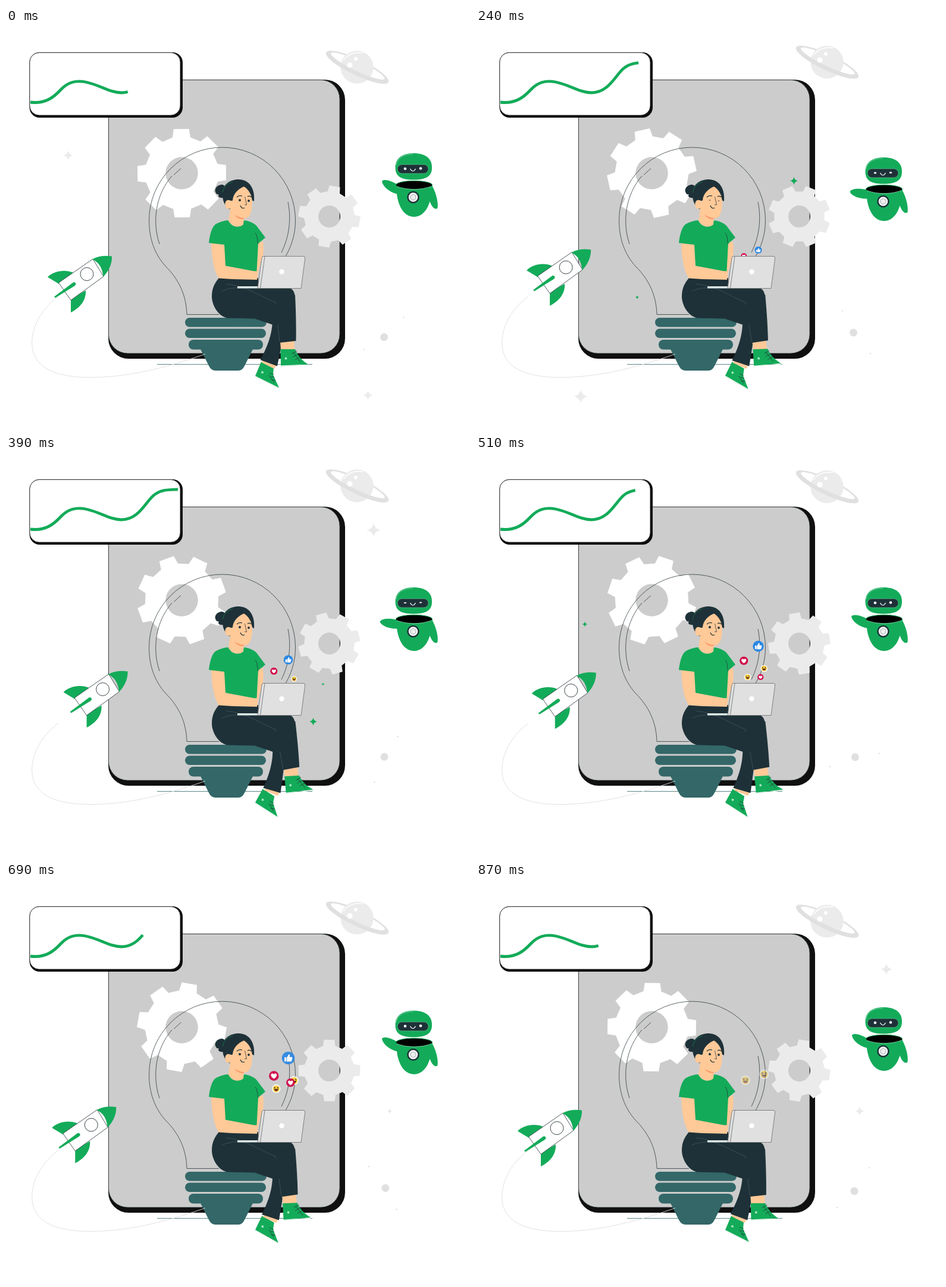
These frames come from a looping animation (780x672 px, 0.9 s). An HTML page:

```html
<!DOCTYPE html>
<html lang="en">
<head>
<meta charset="utf-8">
<title>Bright idea</title>
<style>
html, body { margin: 0; width: 100%; height: 100%; overflow: hidden; background: #fff; }
svg { display: block; width: 100%; height: 100%; }
.g { fill: #13ab59; }
.d { fill: #1e3138; }
.skin { fill: #ffc998; }
.thin { fill: none; stroke: #263238; stroke-width: .75; }
.crease { fill: none; stroke: #42565e; stroke-width: .8; }
</style>
</head>
<body>
<svg viewBox="0 0 780 672">
  <defs>
    <path id="star" d="M0-1Q.17-.17 1 0Q.17.17 0 1Q-.17.17-1 0Q-.17-.17 0-1Z"/>
    <g id="like">
      <circle r="10" fill="#2b87e3"/>
      <path fill="#fff" d="M-6-1h3v6.500h-3zM-2.200-.8L.8-5.800Q2.800-6 2.500-3.500L2-1.500H5.500Q7-1 6.300 1L5 5Q4.500 5.800 3 5.800H-2.200Z"/>
    </g>
    <g id="heart">
      <circle r="10" fill="#d10748"/>
      <path fill="#fff" d="M0 6C-11-1-4-8 0-3C4-8 11-1 0 6Z"/>
    </g>
    <g id="laugh">
      <circle r="10" fill="#fff"/>
      <circle r="8" fill="#fbd23f"/>
      <path d="M-5 .5H5Q4 6 0 6T-5 .5Z" fill="#4a2a18"/>
      <path d="M-2.800 4.500Q0 2.500 2.800 4.500Q0 7-2.800 4.500" fill="#e2483d"/>
      <path d="M-5.500-4L-2-2.500L-5.500-1M5.500-4L2-2.500L5.500-1" fill="none" stroke="#4a2a18" stroke-width="1.300"/>
    </g>
  </defs>

  <!-- panel and chart card -->
  <rect x="172" y="87" width="398" height="470" rx="34" fill="#101010"/>
  <rect x="172.400" y="87.400" width="388.600" height="460.600" rx="32" fill="#ccc" stroke="#263238" stroke-width=".8"/>
  <rect x="39.500" y="41" width="257.500" height="110" rx="17" fill="#0c0c0c"/>
  <rect x="39.800" y="41.400" width="253.200" height="105.600" rx="16" fill="#fff" stroke="#111" stroke-width=".8"/>
  <path id="chart" fill="none" stroke="#13ab59" stroke-width="4.800" d="M41 125C66 128 80 117 92 104C104 91 117 88 134 91C158 96 175 109 194 109C222 109 233 82 247 69C259 58 272 58.500 289 58"/>

  <!-- planet -->
  <g id="planet">
    <path id="ring" fill="#e0e0e0" fill-rule="evenodd" transform="translate(590.500 66) rotate(25.500)" d="M-58 0A58 13.500 0 0 1 58 0A58 13.500 0 0 1-58 0ZM-50-2A50 8.500 0 0 0 50-2A50 8.500 0 0 0-50-2Z"/>
    <circle cx="590" cy="66" r="27.700" fill="#ebebeb"/>
    <path fill="#e0e0e0" transform="translate(590.500 66) rotate(25.500)" d="M-58 0A58 13.500 0 0 0 58 0L50-2A50 8.500 0 0 1-50-2Z"/>
    <circle cx="578" cy="62.500" r="4.600" fill="#fff"/>
    <circle cx="588" cy="52" r="3" fill="#fff"/>
    <path d="M567 55Q578 39 600 42" fill="none" stroke="#fff" stroke-width="1.300"/>
  </g>

  <g id="dots" fill="#e0e0e0">
    <circle r="6.500"/><circle r="1.200"/><circle r="1.200"/>
  </g>

  <!-- robot -->
  <g id="robot">
    <path id="wave" class="g" d="M659 280C645 277 633 267 632 258C636 253 650 258 660 265Z"/>
    <path class="g" d="M714 262C722 274 727 292 725.500 303C721 308 715 300 712 291Z"/>
    <path class="g" d="M656 264C656 298 668 318 686 318C704 318 716 297 716.500 264Z"/>
    <ellipse cx="686" cy="264.500" rx="30.500" ry="7.200" fill="#000" stroke="#13ab59"/>
    <path d="M657 267Q686 277 715 267" fill="none" stroke="#8fd9b1" stroke-width=".8"/>
    <circle cx="684.500" cy="285" r="9" fill="#fff" stroke="#1e3138" stroke-width="2.500"/>
    <path d="M684.500 280l4.400 2.500v5l-4.400 2.500l-4.400-2.500v-5z" fill="#eee" stroke="#8a9a98" stroke-width=".8"/>
    <path class="g" d="M685 211C707 211 716 221 716 235C716 250 706 255.500 685 255.500S654.500 250 654.500 235C654.500 221 664 211 685 211Z"/>
    <path d="M656 231C658 218 669 212.500 684 212.500" fill="none" stroke="#8fd9b1" stroke-width=".8"/>
    <rect x="658" y="230" width="52" height="15" rx="7.500" class="d" stroke="#6cc796" stroke-width=".6"/>
    <g fill="#fff"><ellipse class="led" cx="671" cy="237" rx="2.300"/><ellipse class="led" cx="697" cy="236.500" rx="2.300"/></g>
    <path d="M679.500 237Q684 245 688.500 237" fill="none" stroke="#fff" stroke-width="1.200"/>
  </g>

  <!-- gears and bulb -->
  <path id="big" fill="#fff" fill-rule="evenodd"/>
  <path id="small" fill="#ebebeb" fill-rule="evenodd"/>
  <g class="thin">
    <path d="M358 482.500H304C303 450 291 424 268 401C250 381 240.500 355 240.500 324A123 123 0 0 1 486.500 324C486.500 349 479 370 468 388"/>
    <path d="M282 247.500L294 236.500M279 249C252 280 245 325 258 364M474 293C480 322 476 352 463 378"/>
  </g>
  <g fill="#336768">
    <rect x="301" y="488" width="137" height="15.500" rx="7.700"/>
    <rect x="301" y="506.500" width="136" height="15.500" rx="7.700"/>
    <rect x="307" y="525" width="125" height="16.500" rx="8"/>
    <path d="M327 541H415L401 569Q397 577 391 577H352Q345 577 341 569Z"/>
  </g>
  <path d="M254 566.500H515" stroke="#336768" stroke-width=".8"/>

  <!-- rocket -->
  <path d="M88 452C50 480 38 520 46 547C57 580 100 591 160 588C225 585 290 565 335 549" fill="none" stroke="#dedede" stroke-width=".9"/>
  <g id="rocket">
    <path class="g" d="M70 419.500C80 409 99 406 113 412L89 431ZM109 456V479C123 472 135 460 134 442Z"/>
    <path d="M88.500 429L146 389L164 418.500L109 458.500Z" fill="#fff" stroke="#263238" stroke-width=".8"/>
    <path class="g" d="M145 389.500C156 383.500 167 383 178 384.500C178.500 397 173 409 163.500 419C162 405 157 395 145 389.500Z"/>
    <circle cx="136" cy="414.500" r="11" fill="#fff" stroke="#263238" stroke-width=".9"/>
    <path class="g" d="M81 452.500L113 428.500Q117 427.500 117.500 431.500Q117 433 115 434.500L83 454.500Z"/>
  </g>

  <!-- woman -->
  <g id="shoe">
    <path class="g" d="M429 562L450 572L449 584L459 606L419 586Z"/>
    <path d="M418.500 587L459 607" stroke="#e8f5ee" stroke-width="1.500"/>
    <circle cx="431" cy="580" r="2" fill="#a6e3c2"/>
    <path d="M443 581l7 3M445 587l6 1M446 593l7 0M442 585l9 12" class="thin"/>
  </g>
  <g id="back">
    <path class="skin" d="M431 560L455 568L451 574L429 563Z"/>
    <path class="d" d="M446 492L474 478L464 530L456 569.500L427.500 559C440 536 447 516 448 494Z"/>
  </g>
  <g id="front">
    <path class="skin" d="M461 529L484 526L485 542H462Z"/>
    <path class="g" d="M461.500 541H486C491 553 499 561 508 566.500L462 568.500Z"/>
    <path d="M462 570L508 567.500" stroke="#e3f3ea" stroke-width="1.300"/>
    <circle cx="470.500" cy="556.500" r="2" fill="#a6e3c2"/>
    <path d="M480 549l9-5M482 554l10-5M486 559l9-5M483 546l12 17" class="thin"/>
    <path class="d" d="M452 460L460 530L487.500 527C488 500 487 470 486 450L470 440Z"/>
    <path class="crease" d="M453 463L460 529"/>
  </g>
  <path class="d" d="M358 421H424V437L474 438C482 438 485.500 444 486 455V475L462 500H449L418 489.500L372 488.500C358 486 346 468 346 452C346 437 352 428 358 421Z"/>
  <path class="crease" d="M363 443Q378 436 400 438M370 431C405 434 430 454 453 462V466"/>
  <path class="skin" d="M423 362L432 359C433 370 433 380 431 388L424 408L419 405Z"/>
  <path class="skin" d="M345 362L368 364L370 398L418 409L425 404L422 424L380 423L358 421.500C349 410 346 385 345 362Z"/>
  <path class="g" d="M374 324C380 338 396 338 400 324C410 325 417 329 421 333L436 353L424 363L421.500 409.500L417 409.500L369 400.500L367 365L341 362C343 345 347 332 355 329C361 326 368 324 374 324Z"/>
  <path class="thin" d="M419 345C424 352 422 360 424 364"/>
  <path class="d" d="M353 278C349 272 354 265 361 264C366 263 371 268 371 274C372 282 367 287 362 286C357 286 356 282 358 280Q354 281 353 278Z"/>
  <path class="d" d="M364 281C363 264 376 255 391 255C408 255 419 269 417 292L404 285L381 305H374C367 298 364 290 364 281Z"/>
  <path class="skin" d="M400 267C408 272 413.500 281 414 293C413 310 411 321 400 321L399 331C391 338 380 334 374 325L377 304C367 308 366 292 372 290C377 289 379 293 381 290C382 279 390 271 400 267Z"/>
  <path d="M384 314Q392 320 401 320L398 322Q389 322 384 314Z" fill="#ff9867"/>
  <path d="M364 277Q367 262 381 259" fill="none" stroke="#13ab59" stroke-width=".5"/>
  <g class="d"><ellipse class="eye" cx="393" cy="290" rx="2"/><ellipse class="eye" cx="408" cy="291" rx="1.900"/></g>
  <path d="M388 285Q392 281 397 283M406 284Q409 282 413 285M394 299Q396 305 401 303" fill="none" stroke="#1e3138" stroke-width="1.200"/>
  <path d="M401.500 284L404.500 298L401 297.500" class="thin"/>

  <g id="emojis"></g>

  <!-- laptop -->
  <path d="M389 435H425V438.500H389Z" fill="#dce8e6"/>
  <path d="M433 384.500H500Q503 384.500 502.700 388L496 438.500H423L430 387Q430.500 384.500 433 384.500Z" fill="#e0e0e0" stroke="#777" stroke-width=".9"/>
  <path d="M435 385L427.500 438" class="thin" opacity=".7"/>
  <circle cx="463.500" cy="410.500" r="4.200" fill="#fff"/>

  <g id="stars"></g>
</svg>
<script>
const LOOP = 900, STEP = 30;
const TIMES = [0, 240, 390, 510, 630, 750, 870];
const $ = id => document.getElementById(id);
const set = (el, attrs) => { for (const k in attrs) el.setAttribute(k, attrs[k]); };
const wave = deg => Math.cos(deg * Math.PI / 180);
const bump = (t, peak, half) => Math.max(0, 1 - Math.abs(t - peak) / half);

// Monotone cubic through the key values, periodic over the loop
function track(v, t) {
  const n = TIMES.length;
  const time = i => TIMES[(i + n) % n] + LOOP * Math.floor(i / n);
  const val = i => v[(i + n) % n];
  const slope = i => (val(i + 1) - val(i)) / (time(i + 1) - time(i));
  const tangent = i => {
    const a = slope(i - 1), b = slope(i);
    return a * b > 0 ? 2 * a * b / (a + b) : 0;
  };
  let i = n - 1;
  while (TIMES[i] > t) i--;
  const h = time(i + 1) - time(i), u = (t - time(i)) / h, w = 1 - u;
  return val(i) * w * w * (1 + 2 * u) + val(i + 1) * u * u * (3 - 2 * u)
    + h * u * w * (tangent(i) * w - tangent(i + 1) * u);
}

function gearPath(tip, root, hole) {
  let d = "";
  for (let k = 0; k < 8; k++)
    for (const [r, a] of [[root, -14], [tip, -9.8], [tip, 9.8], [root, 14]]) {
      const q = (k * 45 + a) * Math.PI / 180;
      d += (d ? "L" : "M") + (r * Math.sin(q)).toFixed(2) + " " + (-r * Math.cos(q)).toFixed(2);
    }
  return d + `ZM${hole} 0A${hole} ${hole} 0 1 0 ${-hole} 0A${hole} ${hole} 0 1 0 ${hole} 0Z`;
}

function addUse(parent, ref) {
  const el = document.createElementNS("http://www.w3.org/2000/svg", "use");
  set(el, { href: "#" + ref });
  $(parent).append(el);
  return el;
}

// x, y, radius, peak time, half life, colour
const GREY = "#ebebeb", GREEN = "#13ab59";
const stars = [
  [104.5, 214.5, 8, 0, 130, GREY], [608.5, 618.5, 8, 0, 130, GREY],
  [176, 620.5, 11.5, 240, 110, GREY], [618, 126.5, 11.5, 390, 110, GREY],
  [645, 386, 11, 805, 200, GREY], [690, 147, 9.5, 870, 100, GREY],
  [534.5, 257.5, 6.5, 240, 110, GREEN], [271, 453.5, 3, 240, 100, GREEN],
  [516.5, 449, 6.5, 390, 110, GREEN], [533, 386, 2.5, 390, 90, GREEN],
  [183, 285, 4.5, 510, 100, GREEN]
].map(([x, y, r, peak, half, fill]) => {
  const el = addUse("stars", "star");
  set(el, { fill });
  return { el, x, y, r, peak, half };
});

const fadeEarly = [1, 1, 1, 1, 1, .75, 0], fadeLate = [1, 1, 1, 1, 1, 1, .5];
const emojis = [
  ["like", 474.5, 0, 11, [412, 374, 345, 322, 302.5, 293, 292], fadeEarly],
  ["heart", 450.3, 0, 8.5, [412, 384, 364, 346.5, 331, 324, 323], fadeEarly],
  ["laugh", 484.3, 0, 8, [415, 398, 377, 359.5, 342, 329, 324], fadeLate],
  ["laugh", 453, .09, 8, [415, 405, 390, 374, 357, 341, 334], fadeLate],
  ["heart", 478.3, 0, 8, [415, 408, 396, 374, 350, 329.5, 325], fadeEarly]
].map(([ref, x, drift, r, ys, fade]) => ({ el: addUse("emojis", ref), x, drift, r, ys, fade }));

set($("big"), { d: gearPath(75.5, 62, 27.2) });
set($("small"), { d: gearPath(52.5, 42.5, 18.5) });

const chart = $("chart"), total = chart.getTotalLength();
function lengthAt(x) {
  let lo = 0, hi = total;
  for (let i = 0; i < 16; i++) {
    const mid = (lo + hi) / 2;
    if (chart.getPointAtLength(mid).x < x) lo = mid; else hi = mid;
  }
  return hi;
}

const move = (id, transform) => set($(id), { transform });
const eyes = document.querySelectorAll(".eye"), leds = document.querySelectorAll(".led");
const dots = $("dots").children;

function draw(t) {
  set(chart, { "stroke-dasharray": lengthAt(track([204.5, 273, 289, 267.5, 241, 220, 205.5], t)) + " 999" });

  const fly = track([0, .56, .985, .88, .48, .11, 0], t);
  move("rocket", `translate(${27 * fly} ${-20.3 * fly})`);
  move("planet", `translate(0 ${track([0, -8.5, -14, -12.5, -8, -3, 0], t)})`);
  move("robot", `translate(0 ${track([0, 7, 12, 12, 8.4, 3.2, 0], t)})`);
  move("wave", `rotate(${track([0, -21, -21, -4, 0, 0, 0], t)} 660 273)`);

  move("big", `translate(295.500 244.500) rotate(${-.6 - t * .05})`);
  move("small", `translate(543.500 317.500) rotate(${10.2 + t * .05})`);

  const swing = track([0, .6, 1, 1, .7, .35, .05], t);
  move("front", `rotate(${-4 * swing} 470 445)`);
  move("back", `rotate(${-4 * swing} 455 490)`);
  move("shoe", `rotate(${6 * swing} 425 585)`);

  eyes.forEach(e => set(e, { ry: 2.1 * (1 - .8 * bump(t, 240, 75)) }));
  leds.forEach(e => set(e, { ry: 2.3 * (1 - .9 * bump(t, 340, 150)) }));

  set(dots[0], { cx: 636.2 + 1.8 * wave(.4 * (t - 630)), cy: 514.3 + 6.3 * wave(.4 * (t + 12)) });
  const sway = wave(.4 * (t - 290)), a = .4 * t - 39;
  [1, -1].forEach((side, i) => set(dots[i + 1], {
    cx: 636.3 + 3.4 * sway + side * 43 * wave(a),
    cy: 513.8 - 1.6 * sway + side * 43 * wave(a - 90)
  }));

  for (const s of stars) {
    const k = s.r * bump(t, s.peak, s.half);
    set(s.el, { transform: `translate(${s.x} ${s.y}) scale(${k})` });
  }
  for (const e of emojis) {
    const y = track(e.ys, t), rise = y - e.ys[6];
    set(e.el, {
      transform: `translate(${e.x + e.drift * rise} ${y}) scale(${(e.r - .06 * rise) / 10})`,
      opacity: track(e.fade, t)
    });
  }
}

const start = performance.now();
function tick() {
  const t = (performance.now() - start) % LOOP;
  draw(Math.floor(t / STEP) * STEP);
  requestAnimationFrame(tick);
}
tick();
</script>
</body>
</html>
```
